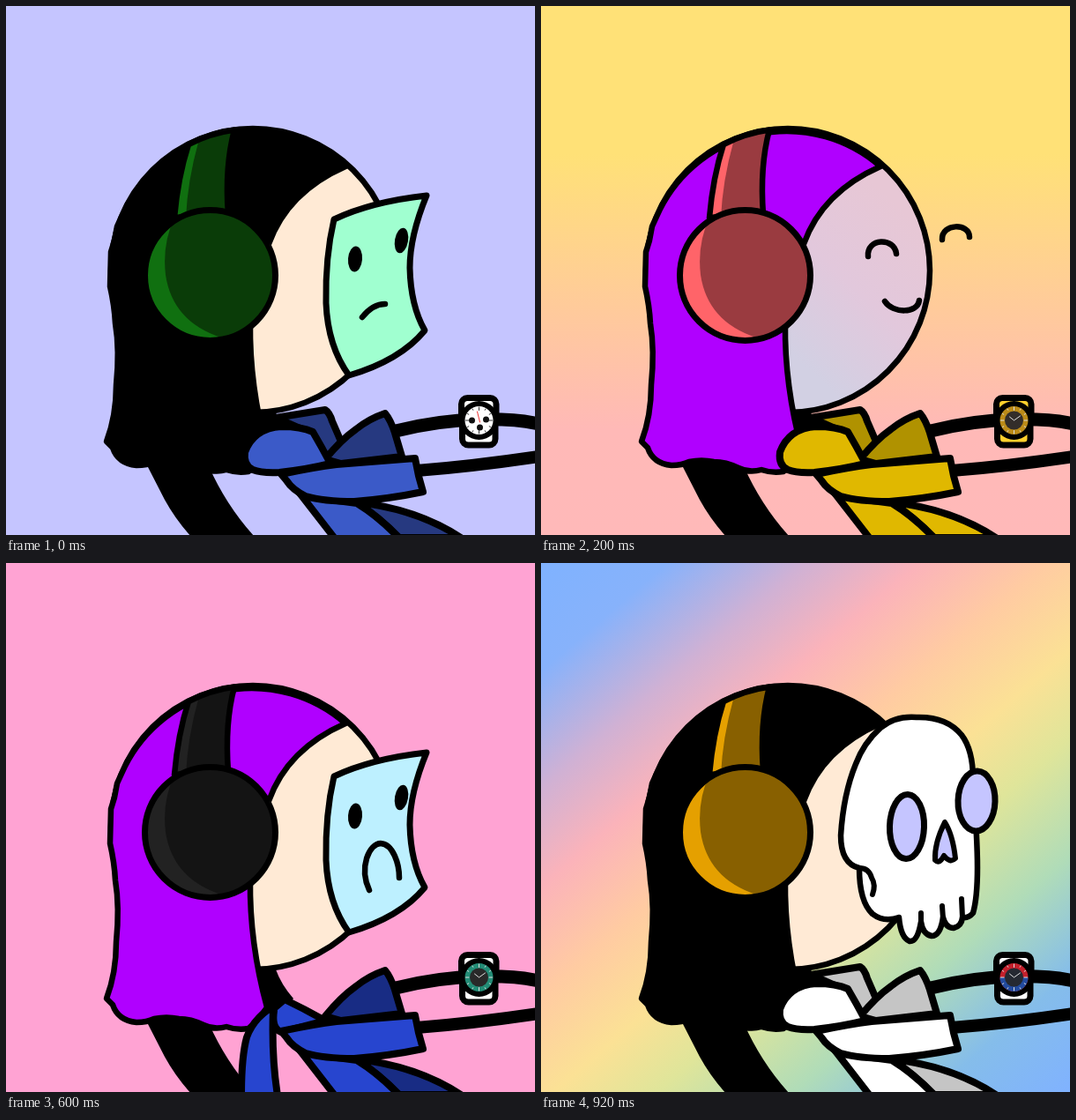
Recreate the animation shown at these times as an HTML page with a canvas. Size 600 px wide and 600 px high, loop 1000 ms.

```html
<!DOCTYPE html>
<html lang="en">
<head>
<meta charset="utf-8">
<title>Outfits</title>
<style>
html, body { margin: 0; width: 100%; height: 100%; overflow: hidden; }
canvas { display: block; width: 100vmin; height: 100vmin; }
</style>
</head>
<body>
<canvas id="stage" width="600" height="600"></canvas>
<script>
const g = document.getElementById('stage').getContext('2d');
const STEP = 200;
const LILAC = '#c5c5ff', SKIN = '#ffead5';

const shape = {
  hair: 'M385 182A161 161 0 0 0 131 239L126 250L123 266L119 279L118 318Q123 340 124 360Q129 390 125 430Q125 465 114 494L121 501Q127 519 148 521Q160 521 168 517Q182 514 196 517Q210 517 224 524Q236 530 250 526Q262 530 275 528Q285 520 296 504Q276 430 277 360L298 270Q319 211 385 182Z',
  arm: 'M158 505L161 523L180 560Q192 582 210 602H282Q250 567 230 522V505Z',
  neck: 'M286 456L306 461Q312 478 326 494L310 512L298 506Z',
  band: 'M207 157A161 161 0 0 1 259 140.5Q248 182 252 236L191 240Q195 194 207 157Z',
  bandDark: 'M218 150L259 139Q248 182 252 236L204 240Q206 198 218 155Z',
  cupDark: 'M191 240Q177 270 181 305Q189 358 244 376L310 376V225H200Z',
  collarBack: 'M306 467L362 458Q367 461 370 471L380 494L362 517L340 482Z',
  bow: 'M362 514Q380 492 397 480Q412 468 430 462Q436 469 441 484L449 511L380 519Z',
  lobe: 'M280 526Q269 521 271 506Q281 479 312 477Q335 477 348 483Q358 500 368 519Q340 526 310 529Q290 530 280 526Z',
  tail: 'M314 528L373 604H446Q424 580 398 564L345 557Z',
  tailBack: 'M398 563Q465 570 516 603H446Q424 580 398 563Z',
  strap: 'M312 531Q350 523 375 520L464 513L468 533L473 551Q435 559 395 562Q360 562 340 556Q325 549 318 538Z',
  sash: 'M309 500Q282 513 273 538Q267 560 267 604H308Q301 560 303 506Z',
  knot: 'M303 506L316 495L338 506L362 519L312 532Q301 528 304 508Z',
  mask: 'M372 242Q414 222 477 215Q458 261 458 297Q459 340 475 368Q447 402 389 419Q365 386 363 337Q362 285 372 242Z',
  skull: 'M385 187Q402 173 426 175Q460 174 477 195Q490 212 490 245Q495 315 495 345Q495 380 490 397Q485 403 478 402Q477 412 468 414Q459 414 456 402Q453 423 443 423Q433 421 431 407Q427 430 418 429Q408 425 406 402Q389 408 376 398Q361 384 361 346Q340 341 340 309Q343 262 357 228Q366 204 385 187Z',
  skullLines: 'M361 346Q372 346 375 357Q380 365 376 376M431 397V408M455 389L456 403M477 381L478 402',
  nose: 'M458 294Q446 318 447 337Q452 342 457 332Q464 341 470 335Q467 308 458 294Z',
  happyEyes: 'M371 284C369 263 401 262 403 281M455 265C454 246 486 246 486 262',
  smile: 'M390 335C399 349 427 349 429 334',
  laugh: 'M376 325Q374 308 386 309Q394 317 408 316Q427 303 437 309Q441 322 434 338Q431 362 416 372Q400 379 386 369Q379 357 380 343Q377 334 376 325Z',
  tongue: 'M379 352Q386 333 408 334Q425 337 431 347Q430 361 416 372Q400 379 386 369Z',
  hatch: 'M186 291L213 261M193 317L240 262M205 336L256 278M230 346L284 288M249 354L283 316M222 165L239 152M216 190L238 166M213 218L240 191'
};
for (const k in shape) shape[k] = new Path2D(shape[k]);

function ink(p, fill, width = 7) {
  if (fill) { g.fillStyle = fill; g.fill(p); }
  if (width) { g.lineWidth = width; g.strokeStyle = '#000'; g.stroke(p); }
}

function oval(x, y, rx, ry = rx, tilt = 0) {
  const p = new Path2D();
  p.ellipse(x, y, rx, ry, tilt, 0, 7);
  return p;
}

function blend(x0, y0, x1, y1, ...stops) {
  const f = g.createLinearGradient(x0, y0, x1, y1);
  for (const [at, color] of stops) f.addColorStop(at, color);
  return f;
}

function clipped(area, path, fill) {
  g.save();
  g.clip(area);
  ink(path, fill, 0);
  g.restore();
}

const noteFace = (color, mouth) => () => {
  ink(shape.mask, color);
  ink(oval(396, 287, 8, 14.5, 0.08), '#000', 0);
  ink(oval(448.5, 266, 7.5, 14.5, 0.17), '#000', 0);
  ink(new Path2D(mouth), null, 6.5);
};

function smileFace() {
  ink(shape.happyEyes, null, 6.5);
  ink(shape.smile, null, 6.5);
}

function laughFace() {
  ink(shape.happyEyes, null, 6.5);
  ink(shape.laugh, LILAC, 6.5);
  ink(shape.tongue, '#ffa3d3', 6);
}

function skullFace() {
  ink(shape.skull, '#fff', 6.5);
  ink(shape.skullLines, null, 6);
  ink(oval(415, 299, 19.5, 36.5, 0.03), LILAC);
  ink(oval(494, 270, 21, 34, 0.03), LILAC);
  ink(shape.nose, LILAC, 6);
}

const looks = [
  {
    back: LILAC, face: SKIN, hair: '#000', phones: ['#0a3c08', '#107010'],
    cloth: ['#3b5ac8', '#263980'], front: noteFace('#a0ffd0', 'M404 353Q416 338 430 338'),
    watch: { strap: '#fff', ring: '#fff', dial: '#fff', chrono: true }
  },
  {
    back: blend(0, 0, 0, 600, [0, '#ffe177'], [0.28, '#ffe177'], [0.8, '#ffb9b7'], [1, '#ffb9b9']),
    face: blend(290, 400, 430, 250, [0, '#d2d0e3'], [0.5, '#e2c8dc'], [1, '#e7c7d5']),
    hair: '#b000ff', phones: ['#9a3b40', '#ff6469'], cloth: ['#e0b800', '#b09200'],
    tailBack: '#e0b800', front: smileFace,
    watch: { strap: '#ffd02d', ring: '#bc8b18', dial: '#332d2a' }
  },
  {
    back: blend(0, 0, 35, 600, [0, '#93eee9'], [0.13, '#96ede4'], [0.74, '#ffe177'], [1, '#ffe177']),
    face: '#b5ffc9', hair: '#f00', phones: ['#999', '#fff'], hatch: true, tied: true,
    cloth: ['#1a8528', '#12611c'], front: laughFace,
    watch: { strap: '#bbb', ring: '#777', dial: '#38332f' }
  },
  {
    back: '#ffa3d3', face: SKIN, hair: '#b000ff', phones: ['#141414', '#222'], tied: true,
    cloth: ['#2745cf', '#182c84'],
    front: noteFace('#bdf0ff', 'M412 371C400 345 412 318 425 318C439 319 446 341 446 357'),
    watch: { strap: '#fff', ring: '#238c76', dial: '#292929' }
  },
  {
    back: blend(0, 0, 550, 643, [0, '#7fb2ff'], [0.11, '#87b2fb'], [0.23, '#d0b1d4'],
      [0.33, '#fbb3ba'], [0.44, '#ffcba2'], [0.55, '#fbe195'], [0.64, '#dfe59a'],
      [0.76, '#b0dcb8'], [0.88, '#85bdea'], [1, '#80b2ff']),
    face: SKIN, hair: '#000', phones: ['#886000', '#e5a000'],
    cloth: ['#fff', '#c5c5c5'], front: skullFace,
    watch: { strap: '#fff', ring: '#c3202c', low: '#234b9f', dial: '#252932' }
  }
];

function head(l) {
  ink(oval(280, 300, 161), l.face, 6.5);
  ink(shape.hair, l.hair, 6.5);
}

function headphones({ phones: [dark, light], hatch }) {
  const cup = oval(231.5, 305.5, 74);
  ink(shape.band, light, 0);
  clipped(shape.band, shape.bandDark, dark);
  ink(shape.band, null, 6.5);
  ink(cup, light, 0);
  clipped(cup, shape.cupDark, dark);
  ink(cup, null, 7);
  if (hatch) ink(shape.hatch, null, 1.7);
}

function hands() {
  ink(new Path2D('M442 482Q490 470 535 469Q578 468 604 474'), null, 15);
  ink(new Path2D('M466 527Q530 522 604 511'), null, 14);
}

function clothes({ cloth: [main, dark], tied, tailBack }) {
  ink(shape.tailBack, tailBack || dark, 8);
  ink(shape.tail, main, 8);
  if (!tied) ink(shape.collarBack, dark, 8);
  ink(shape.bow, dark, 8);
  if (tied) {
    ink(shape.sash, main, 8);
    ink(shape.knot, main, 8);
  } else {
    ink(shape.lobe, main, 8);
  }
  ink(shape.strap, main, 8);
}

function watch({ strap, ring, low, dial, chrono }) {
  const belt = new Path2D();
  belt.roundRect(516.5, 444.5, 39.5, 30, 7);
  belt.roundRect(517.5, 466, 37.5, 32, 7);
  ink(belt, strap, 7);
  ink(oval(536.5, 470, 22), '#000', 0);
  ink(oval(536.5, 470, 16), ring, 0);
  if (low) {
    const half = new Path2D();
    half.arc(536.5, 470, 16, 0, Math.PI);
    ink(half, low, 0);
  }
  ink(oval(536.5, 470, chrono ? 15 : 10.5), dial, 0);

  g.save();
  g.translate(536.5, 470);
  g.lineWidth = 1;
  g.strokeStyle = chrono ? '#333' : '#ddd';
  g.beginPath();
  for (let i = 0; i < 12; i++) {
    const a = i * Math.PI / 6, c = Math.cos(a), s = Math.sin(a);
    const r = i % 3 ? 13.5 : 11.5;
    g.moveTo(c * r, s * r);
    g.lineTo(c * 15, s * 15);
  }
  if (!chrono) {
    g.moveTo(-5, -4);
    g.lineTo(0, 0);
    g.lineTo(7, -5);
  }
  g.stroke();
  if (chrono) {
    for (const [x, y] of [[-8, 0], [8, -1], [1, 8]]) ink(oval(x, y, 3.5), '#111', 0);
    g.strokeStyle = '#e33';
    g.beginPath();
    g.moveTo(-2, -10);
    g.lineTo(1, 2);
    g.stroke();
  }
  g.restore();
}

function draw(ms) {
  const l = looks[Math.floor(ms / STEP) % looks.length];
  g.lineJoin = g.lineCap = 'round';
  g.fillStyle = l.back;
  g.fillRect(0, 0, 600, 600);
  ink(shape.arm, '#000', 0);
  ink(shape.neck, '#000', 0);
  head(l);
  headphones(l);
  hands();
  clothes(l);
  watch(l.watch);
  l.front();
}

function tick() {
  draw(performance.now());
  requestAnimationFrame(tick);
}
tick();
</script>
</body>
</html>
```
